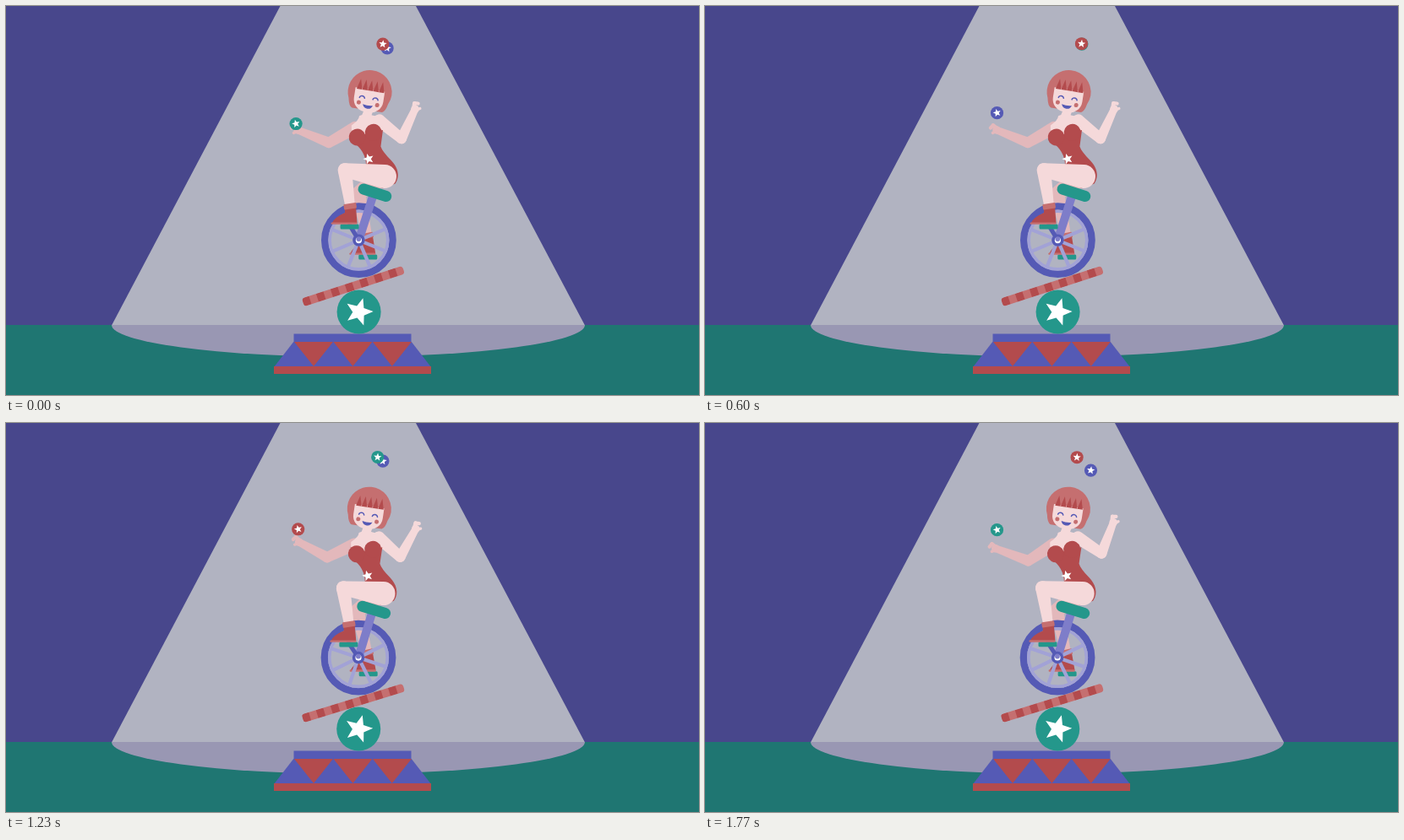
Animation, 820 px wide and 461 px high, one loop 1800 ms. Source, as an HTML page with a canvas:

```html
<!DOCTYPE html>
<html lang="en">
<head>
<meta charset="utf-8">
<title>Circus juggler</title>
<style>
html, body { margin: 0; width: 100%; height: 100%; overflow: hidden; background: #48478c; }
canvas { display: block; width: 820px; height: 461px; }
</style>
</head>
<body>
<canvas id="stage" width="820" height="461"></canvas>
<script>
const ctx = document.getElementById('stage').getContext('2d');
const TAU = Math.PI * 2, RAD = Math.PI / 180;
const LOOP = 1800, SWAY = 600;
const C = {
  wall: '#48478c', beam: '#b1b3c1', floor: '#1f7672', pool: '#9997b3',
  blue: '#555ab5', post: '#7e7dc9', lilac: '#a2a2d6', teal: '#24978b',
  red: '#b34b4d', rose: '#c56f70', skin: '#f5d9da', shade: '#e3b8bb', white: '#fff'
};

function poly(points, fill) {
  ctx.beginPath();
  points.forEach(([x, y]) => ctx.lineTo(x, y));
  ctx.closePath();
  ctx.fillStyle = fill;
  ctx.fill();
}

function disc(x, y, r, fill) {
  ctx.beginPath();
  ctx.arc(x, y, r, 0, TAU);
  ctx.fillStyle = fill;
  ctx.fill();
}

function box(x, y, w, h, r, fill) {
  ctx.beginPath();
  ctx.roundRect(x, y, w, h, r);
  ctx.fillStyle = fill;
  ctx.fill();
}

function line(a, b, width, color, cap = 'butt') {
  ctx.beginPath();
  ctx.moveTo(a[0], a[1]);
  ctx.lineTo(b[0], b[1]);
  ctx.lineWidth = width;
  ctx.lineCap = cap;
  ctx.strokeStyle = color;
  ctx.stroke();
}

function arc(x, y, r, from, to, width, color) {
  ctx.beginPath();
  ctx.arc(x, y, r, from, to);
  ctx.lineWidth = width;
  ctx.lineCap = 'round';
  ctx.strokeStyle = color;
  ctx.stroke();
}

function star(x, y, r, turn, fill = C.white) {
  const points = [];
  for (let i = 0; i < 10; i++) {
    const a = turn - Math.PI / 2 + i * TAU / 10, d = i % 2 ? r * 0.43 : r;
    points.push([x + d * Math.cos(a), y + d * Math.sin(a)]);
  }
  poly(points, fill);
}

// Tapered limb with round ends
function limb(a, ra, b, rb, fill) {
  const dx = b[0] - a[0], dy = b[1] - a[1];
  const dir = Math.atan2(dy, dx);
  const open = Math.acos((ra - rb) / Math.hypot(dx, dy));
  ctx.beginPath();
  ctx.arc(a[0], a[1], ra, dir + open, dir - open + TAU);
  ctx.arc(b[0], b[1], rb, dir - open, dir + open);
  ctx.closePath();
  ctx.fillStyle = fill;
  ctx.fill();
}

function placed(x, y, turn, draw) {
  ctx.save();
  ctx.translate(x, y);
  ctx.rotate(turn);
  draw();
  ctx.restore();
}

// Point blended over left, middle and right lean (c from -1 to 1)
function lean(c, l, m, r) {
  return m.map((v, i) => v + c * (r[i] - l[i]) / 2 + c * c * ((r[i] + l[i]) / 2 - v));
}

// Smooth periodic path through four poses, a quarter cycle apart
function cycle(p, a, b, c, d) {
  const w = p * TAU;
  return a.map((v, i) =>
    (v + b[i] + c[i] + d[i]) / 4
    + (v - c[i]) / 2 * Math.cos(w)
    + (b[i] - d[i]) / 2 * Math.sin(w)
    + (v - b[i] + c[i] - d[i]) / 4 * Math.cos(2 * w));
}

function scene() {
  ctx.fillStyle = C.wall;
  ctx.fillRect(0, 0, 820, 378);
  ctx.fillStyle = C.floor;
  ctx.fillRect(0, 378, 820, 83);
  poly([[324.5, 0], [485, 0], [685, 378.5], [125, 378.5]], C.beam);
  ctx.beginPath();
  ctx.ellipse(405, 378, 280, 37.5, 0, 0, Math.PI);
  ctx.fillStyle = C.pool;
  ctx.fill();

  poly([[341, 397], [479, 397], [503, 428], [317, 428]], C.blue);
  for (let x = 341; x < 470; x += 46.4) {
    poly([[x, 398], [x + 46, 398], [x + 23, 427]], C.red);
  }
  box(340.5, 388.5, 139, 9, 0, C.blue);
  box(317, 427, 186, 9, 0, C.red);
}

function balance(c) {
  const x = 410.2 + 7.4 * c;
  disc(x, 362.5, 26, C.teal);
  star(x, 362.5, 17, 16.5 * c * RAD);
  placed(410 + 0.9 * c, 331.3 + 0.6 * c * c, (-1 - 17 * c) * RAD, () => {
    ctx.beginPath();
    ctx.roundRect(-62.5, -5, 125, 10, 3.5);
    ctx.fillStyle = C.rose;
    ctx.fill();
    ctx.clip();
    const step = 125 / 14;
    ctx.fillStyle = C.red;
    for (let i = 0; i < 14; i += 2) ctx.fillRect(-62.5 + i * step, -5, step, 10);
  });
}

function boot(pedal, ankle, knee) {
  const [x, y] = pedal, [ax, ay] = ankle;
  const dir = Math.atan2(ay - knee[1], ax - knee[0]) - Math.PI / 2;
  ctx.beginPath();
  ctx.moveTo(x - 21, y - 4);
  ctx.quadraticCurveTo(x - 18, y - 11, ax - 6, Math.min(ay + 9, y - 12));
  ctx.lineTo(ax - 6, ay + 2);
  ctx.lineTo(ax + 7, ay + 2);
  ctx.lineTo(x + 9, y - 4);
  ctx.closePath();
  ctx.fillStyle = C.red;
  ctx.fill();
  box(x - 22, y - 5, 31, 2.4, 1, C.rose);
  placed(ax, ay, dir, () => box(-7.5, -2, 15, 6.5, 1, C.rose));
}

function leg(hip, knee, ankle, pedal, skin, thick) {
  limb(hip, thick, knee, 8.3, skin);
  limb(knee, 8.3, ankle, 5.8, skin);
  boot(pedal, ankle, knee);
}

function pedalPlate([x, y]) {
  box(x - 11, y - 3, 22, 6, 1.5, C.teal);
}

function wheel(x, y, c) {
  arc(x, y, 40.2, 0, TAU, 8.4, C.blue);
  arc(x, y, 34.3, 0, TAU, 3.6, C.lilac);
  for (let i = 0; i < 8; i++) {
    const a = i * TAU / 8 + 67 * c * RAD;
    line([x, y], [x + 34 * Math.cos(a), y + 34 * Math.sin(a)], 4.2, C.lilac);
  }
}

function hub(x, y, turn) {
  disc(x, y, 7.2, C.blue);
  disc(x, y, 3.6, C.white);
  disc(x - 1.5 * Math.cos(turn), y - 1.5 * Math.sin(turn), 2.9, C.post);
}

function arm(shoulder, elbow, hand, skin, side) {
  limb(shoulder, 7.5, elbow, 6.2, skin);
  limb(elbow, 6.2, hand, 4.2, skin);
  const out = Math.atan2(hand[1] - elbow[1], hand[0] - elbow[0]);
  placed(hand[0], hand[1], out, () => {
    disc(0, 0, 4.8, skin);
    line([1, side * 2], [6, side * 3.5], 4.6, skin, 'round');
    line([6, side * 3.5], [7.5, -side * 0.5], 4.2, skin, 'round');
    line([0, -side * 2], [3, -side * 5], 3.4, skin, 'round');
  });
}

// Coordinates are relative to the star on the costume
function chest() {
  ctx.beginPath();
  ctx.moveTo(4, -52);
  ctx.quadraticCurveTo(2, -47, -8, -44);
  ctx.lineTo(-12, -30);
  ctx.lineTo(22, -26);
  ctx.lineTo(31, -44);
  ctx.quadraticCurveTo(17, -47, 15, -53);
  ctx.closePath();
  ctx.fillStyle = C.skin;
  ctx.fill();
}

function costume() {
  ctx.beginPath();
  ctx.moveTo(-14, -26);
  ctx.quadraticCurveTo(-2, -14, -4, 2);
  ctx.quadraticCurveTo(-7, 14, -8, 24);
  ctx.lineTo(6, 38);
  ctx.lineTo(22, 37);
  ctx.bezierCurveTo(31, 30, 30, 18, 25, 9);
  ctx.quadraticCurveTo(18, -4, 18, -10);
  ctx.lineTo(26, -28);
  ctx.lineTo(4, -29);
  ctx.closePath();
  ctx.fillStyle = C.red;
  ctx.fill();
  disc(-5.5, -28.5, 10, C.red);
  disc(14.5, -28.5, 10, C.red);
  star(0, 0, 6.6, 0);
}

function head() {
  ctx.beginPath();
  ctx.arc(0, 0, 26, Math.PI * 0.86, Math.PI * 2.14);
  ctx.quadraticCurveTo(22, 20, 18, 21.5);
  ctx.lineTo(-18, 21.5);
  ctx.quadraticCurveTo(-22, 20, -23.6, 11);
  ctx.closePath();
  ctx.fillStyle = C.rose;
  ctx.fill();
  box(-17.5, -3, 35, 27, [0, 0, 15, 15], C.skin);
  for (let i = -2; i <= 2; i++) {
    const x = i * 6.6 + 0.5;
    poly([[x - 3.3, -1.5], [x, -14], [x + 3.3, -1.5]], C.red);
  }
  for (const s of [-1, 1]) {
    arc(s * 8, 9, 3.2, Math.PI * 1.08, Math.PI * 1.92, 1.5, C.blue);
    disc(s * 11, 14, 2.5, C.rose);
  }
  ctx.beginPath();
  ctx.moveTo(-6, 15.5);
  ctx.quadraticCurveTo(0, 17, 6, 15.5);
  ctx.quadraticCurveTo(4.5, 20, 0, 20);
  ctx.quadraticCurveTo(-4.5, 20, -6, 15.5);
  ctx.fillStyle = C.blue;
  ctx.fill();
}

function rider(c, p) {
  const hx = 410 + 7.4 * c, hy = 282 - 4.4 * c * c;
  const crank = (8.9 + 50 * c) * RAD;
  const tilt = (1 + 16.7 * c) * RAD;
  const px = 21 * Math.cos(crank), py = 21 * Math.sin(crank);
  const near = [hx - px, hy - py + 1.8], far = [hx + px, hy + py + 1.8];

  const turn = -16.5 * c * RAD;
  const tx = 406 + 23 * c, ty = 178 + 3.3 * c;
  const onBody = (x, y) => [
    tx + x * Math.cos(turn) - y * Math.sin(turn),
    ty + x * Math.sin(turn) + y * Math.cos(turn)
  ];

  pedalPlate(far);
  leg(lean(c, [385, 205], [414, 206], [440, 205]),
      lean(c, [367, 242], [391, 232], [417, 222]),
      lean(c, [407, 252], [422, 264], [427, 271]), far, C.shade, 11);
  wheel(hx, hy, c);

  placed(hx, hy, tilt, () => line([0, 0], [0, -57], 10, C.post));
  line([hx, hy], [near[0], near[1] - 1.8], 5, C.blue, 'round');
  hub(hx, hy, crank + 0.5);
  placed(hx, hy, tilt, () => box(-19.5, -66, 41, 13, 6.5, C.teal));

  arm(onBody(-5, -40),
      cycle(p, [382, 162], [367, 147], [364, 158], [375, 160]),
      cycle(p, [345, 147], [352, 108], [347, 122], [343, 132]), C.shade, 1);
  placed(tx, ty, turn, chest);
  arm(onBody(25, -40),
      cycle(p, [468, 157], [458, 160], [451, 161], [467, 146]),
      cycle(p, [484, 122], [487, 134], [486, 143], [482, 109]), C.skin, -1);

  const neck = onBody(10, -47);
  const hd = [416.5 + 14 * c, 98 + 0.9 * c + 3.1 * c * c];
  line(neck, [hd[0], hd[1] + 18], 10.5, C.skin);
  placed(tx, ty, turn, costume);
  placed(hd[0], hd[1], 9 * c * RAD, head);

  pedalPlate(near);
  leg(lean(c, [384.5, 202], [418, 203], [448, 202]),
      lean(c, [354, 239], [371, 217], [401, 194.5]),
      lean(c, [380, 270], [387, 257], [407, 236]), near, C.skin, 14);
}

function juggle(t) {
  for (const [delay, color] of [[630, C.blue], [0, C.teal], [1200, C.red]]) {
    const u = (t - delay + LOOP) % LOOP;
    const k = (u < 900 ? u : LOOP - u) / 900;
    const across = (Math.cos(k * Math.PI) + 1 - 2 * k) / 2;
    const x = 415.5 - 72.5 * across;
    const y = 33 + 107 * (2 * k - 1) ** 2;
    disc(x, y, 7.6, color);
    star(x, y, 4.9, -0.25 * across);
  }
}

function frame(now) {
  const t = now % LOOP;
  const p = (t % SWAY) / SWAY;
  const c = Math.cos(p * TAU);
  scene();
  balance(c);
  rider(c, p);
  juggle(t);
}

const start = performance.now();
function tick() {
  frame(performance.now() - start);
  requestAnimationFrame(tick);
}
tick();
</script>
</body>
</html>
```
